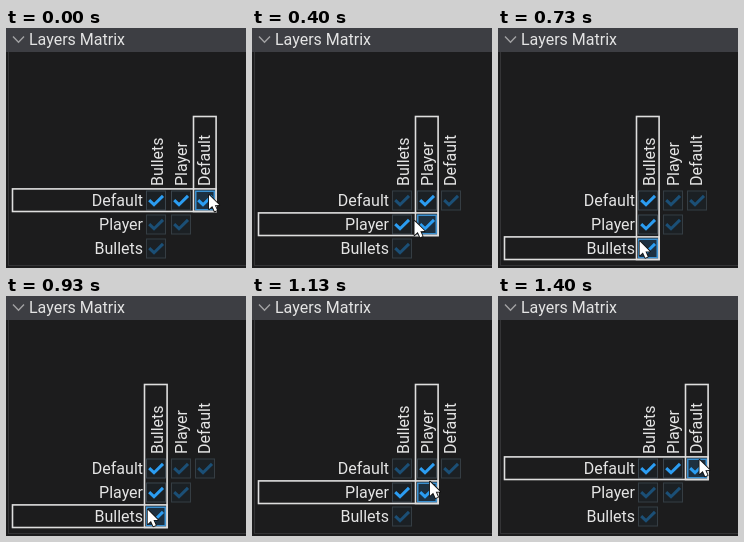
Animation of 240 by 240 pixels, one loop 1.47 s. Source, as an HTML page with a canvas:

```html
<!DOCTYPE html>
<html>
<head>
<meta charset="utf-8">
<style>
  html, body { margin: 0; width: 100%; height: 100%; overflow: hidden; background: #1c1c1d; }
  canvas { display: block; width: 240px; height: 240px; }
</style>
</head>
<body>
<canvas id="stage" width="240" height="240"></canvas>
<script>
const ctx = document.getElementById('stage').getContext('2d');
const LOOP = 1470, LAST_STEP = 21, STEP = 1000 / 15;
const rows = ['Default', 'Player', 'Bullets'];
const cols = ['Bullets', 'Player', 'Default'];
const cellX = c => Math.round(140 + c * 24.7);
const cellY = r => 162.5 + r * 24;

// Pointer path: time, x, y
const path = [
  [0, 203, 167], [270, 186.5, 181], [400, 162.5, 193], [600, 147.5, 208],
  [930, 141.5, 214], [1130, 177.5, 186], [1400, 201.5, 164]
];

function keyAt(i) {
  const n = path.length, [t, x, y] = path[(i + n) % n];
  return [t + Math.floor(i / n) * LOOP, x, y];
}

function pointerAt(time) {
  const t = (time + LOOP) % LOOP;
  let i = path.length - 1;
  while (path[i][0] > t) i--;
  const [a, b, c, d] = [-1, 0, 1, 2].map(k => keyAt(i + k));
  const span = c[0] - b[0], u = (t - b[0]) / span;
  return [1, 2].map(k => {
    const v0 = (c[k] - a[k]) / (c[0] - a[0]) * span;
    const v1 = (d[k] - b[k]) / (d[0] - b[0]) * span;
    return b[k] + u * (v0 + u * (3 * (c[k] - b[k]) - 2 * v0 - v1
      + u * (2 * (b[k] - c[k]) + v0 + v1)));
  });
}

function line(points, color, width) {
  ctx.beginPath();
  points.forEach(([x, y]) => ctx.lineTo(x, y));
  ctx.strokeStyle = color;
  ctx.lineWidth = width;
  ctx.stroke();
}

function rect(color, x, y, w, h) {
  ctx.fillStyle = color;
  ctx.fillRect(x, y, w, h);
}

function outline(color, width, x, y, w, h) {
  ctx.strokeStyle = color;
  ctx.lineWidth = width;
  ctx.strokeRect(x, y, w, h);
}

function label(text, x, y, align = 'left', angle = 0) {
  ctx.save();
  ctx.translate(x, y);
  ctx.rotate(angle);
  ctx.font = '16px Roboto, sans-serif';
  ctx.textAlign = align;
  ctx.fillStyle = '#e4e4e4';
  ctx.fillText(text, 0, 0);
  ctx.restore();
}

function drawCell(r, c, lit, hovered) {
  const x = cellX(c), y = cellY(r);
  rect(hovered ? '#1d3040' : '#1b2024', x, y, 20, 20);
  if (hovered) outline('#3a8fcf', 1.5, x + .75, y + .75, 18.5, 18.5);
  else outline(lit ? '#3b454d' : '#353d43', 1, x + .5, y + .5, 19, 19);
  line([[x + 3.2, y + 9.6], [x + 8, y + 14.2], [x + 17, y + 5.4]], lit ? '#2b9df2' : '#1b4f76', 3);
}

function drawPointer(x, y) {
  ctx.save();
  ctx.translate(x, y);
  ctx.scale(.88, .88);
  ctx.beginPath();
  [[0, 0], [0, 16], [3.7, 12.6], [6.4, 18.6], [9.2, 17.4], [6.6, 11.6], [11.6, 11.4]]
    .forEach(([px, py]) => ctx.lineTo(px, py));
  ctx.closePath();
  ctx.lineJoin = 'round';
  ctx.strokeStyle = '#111';
  ctx.lineWidth = 2;
  ctx.stroke();
  ctx.fillStyle = '#fff';
  ctx.fill();
  ctx.restore();
}

function draw(t) {
  const time = Math.min(LAST_STEP, Math.floor(t / STEP + .06)) * STEP;
  // The highlight trails the pointer by one step
  const [hx, hy] = pointerAt(time - STEP);
  const hc = hx < 162.5 ? 0 : hx < 187 ? 1 : 2;
  const hr = hy < 185 ? 0 : hy < 209 ? 1 : 2;

  rect('#1c1c1d', 0, 0, 240, 240);
  rect('#3d3e43', 0, 0, 240, 24);
  rect('#343436', 2, 24, 1, 214);
  rect('#343436', 2, 237, 238, 1);
  line([[7, 8.6], [12.5, 14.3], [18, 8.6]], '#a2a2a4', 1.4);
  label('Layers Matrix', 23, 17);

  rows.forEach((name, r) => {
    label(name, 137, 178 + r * 24, 'right');
    for (let c = 0; c < 3 - r; c++)
      drawCell(r, c, r === hr || c === hc, r === hr && c === hc);
  });
  cols.forEach((name, c) => label(name, 157 + c * 23.5, 158, 'left', -Math.PI / 2));

  const left = cellX(hc) - 1.5, right = left + 22.6;
  const top = cellY(hr) - 1.6, bottom = top + 22.6;
  outline('#dedede', 1.6, left, 88.5, right - left, bottom - 88.5);
  outline('#dedede', 1.6, 6.5, top, right - 6.5, bottom - top);
  drawPointer(...pointerAt(time));
}

const start = performance.now();
function tick() {
  draw((performance.now() - start) % LOOP);
  requestAnimationFrame(tick);
}
tick();
</script>
</body>
</html>
```
